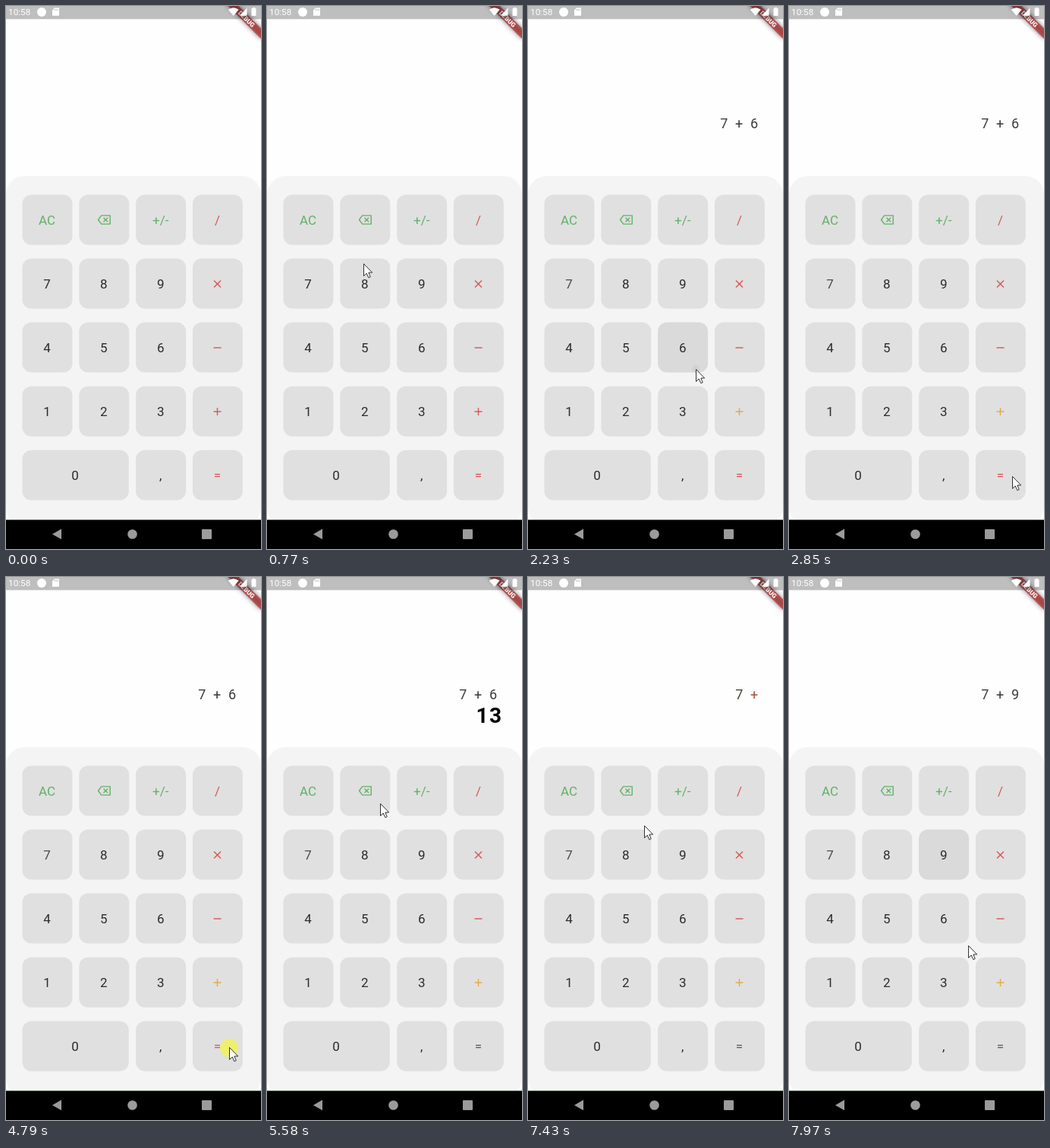
An HTML page with a canvas that plays this animation: 336x715 px, repeating every 8 s.

```html
<!DOCTYPE html>
<html lang="en">
<head>
<meta charset="utf-8">
<title>Calculator</title>
<style>
html, body { margin: 0; width: 336px; height: 715px; overflow: hidden; background: #fefefe; }
canvas { display: block; }
</style>
</head>
<body>
<canvas id="stage" width="336" height="715"></canvas>
<script>
const ctx = document.getElementById('stage').getContext('2d');
const LOOP = 8000, STEP = 77.5;
const FONT = 'Roboto, sans-serif';
const GREEN = '#62b267', RED = '#d95654', ORANGE = '#e5a940', INK = '#2b2b2b';

const rows = [
  ['AC', 'back', '+/-', '/'],
  ['7', '8', '9', '×'],
  ['4', '5', '6', '−'],
  ['1', '2', '3', '+'],
  ['0', '', ',', '=']
];

// pointer path: step, x, y
const path = [
  [1, 304, 692], [5, 138, 340], [8, 138, 340], [9, 134, 334], [14, 68, 379],
  [16, 70, 384], [18, 71, 386], [20, 262, 529], [22, 278, 540], [24, 279, 541],
  [27, 220, 477], [29, 221, 478], [32, 286, 592], [33, 291, 612], [34, 293, 618],
  [36, 293, 618], [37, 294, 619], [64, 294, 619], [72, 149, 298],
  [95, 149, 298], [96, 153, 327], [99, 207, 382], [100, 208, 384], [103, 236, 485]
];

// click step, pressed key, first and last step of the key highlight
const clicks = [
  [16, '7', 17, 19], [22, '+', 23, 25], [27, '6', 28, 30],
  [62, '=', 63, 65], [83, 'back', 84, 86], [99, '9', 100, 103]
];

function poly(points) {
  ctx.beginPath();
  points.forEach(([x, y], i) => i ? ctx.lineTo(x, y) : ctx.moveTo(x, y));
  ctx.closePath();
}

function box(x, y, w, h, r, color) {
  ctx.fillStyle = color;
  ctx.beginPath();
  ctx.roundRect(x, y, w, h, r);
  ctx.fill();
}

function disc(x, y, r, color) {
  ctx.fillStyle = color;
  ctx.beginPath();
  ctx.arc(x, y, r, 0, 7);
  ctx.fill();
}

function label(s, x, y, size, color, weight = 400, align = 'center') {
  ctx.font = `${weight} ${size}px ${FONT}`;
  ctx.textAlign = align;
  ctx.fillStyle = color;
  ctx.fillText(s, x, y);
}

function line(x1, y1, x2, y2) {
  ctx.beginPath();
  ctx.moveTo(x1, y1);
  ctx.lineTo(x2, y2);
  ctx.stroke();
}

function sign(kind, x, y, color) {
  ctx.strokeStyle = color;
  ctx.lineWidth = 1.4;
  if (kind === '×') {
    line(x - 4.5, y - 4.5, x + 4.5, y + 4.5);
    line(x - 4.5, y + 4.5, x + 4.5, y - 4.5);
  } else {
    line(x - 5, y, x + 5, y);
    if (kind === '+') line(x, y - 5, x, y + 5);
  }
}

function backspace(x, y) {
  ctx.strokeStyle = GREEN;
  ctx.lineWidth = 1.4;
  ctx.lineJoin = 'round';
  poly([[x - 8, y], [x - 3.8, y - 5.6], [x + 7.7, y - 5.6], [x + 7.7, y + 5.6], [x - 3.8, y + 5.6]]);
  ctx.stroke();
  line(x - 1, y - 2.8, x + 4.6, y + 2.8);
  line(x - 1, y + 2.8, x + 4.6, y - 2.8);
}

function keyColor(key, row, col, k) {
  if (key === '7' && k >= 17) return '#4c4c4c';
  if (key === '+' && k >= 23) return ORANGE;
  if (key === '=' && k >= 64) return '#6b5353';
  if (col === 3) return RED;
  return row === 0 ? GREEN : INK;
}

function keypad(k) {
  box(0, 224, 336, 460, 24.5, '#f4f4f4');
  rows.forEach((row, r) => row.forEach((key, c) => {
    if (!key) return;
    const x = 21.5 + c * 74.8, y = 248.4 + r * 84.1;
    const w = key === '0' ? 140.3 : 66;
    const down = clicks.some(([, name, a, b]) => name === key && k >= a && k <= b);
    box(x, y, w, 66, 12, down ? '#dadada' : '#e0e0e0');
    const cx = key === '0' ? 91 : x + 32.6, cy = y + 33.4;
    const color = keyColor(key, r, c, k);
    if (key === 'back') backspace(129.5, 281.5);
    else if ('×−+'.includes(key)) sign(key, cx, cy, color);
    else label(key, cx, cy + 6, 17, color);
  }));
}

function readout(k) {
  let text = '';
  if (k >= 17) text = '7';
  if (k >= 24) text = '7+';
  if (k >= 28) text = '7+6';
  if (k >= 85) text = '7+';
  if (k >= 100) text = '7+9';
  const tinted = k >= 85 && k < 100;
  [...text].forEach((ch, i) => {
    const color = !tinted ? '#3c3c3c' : ch === '+' ? '#a8503f' : '#45452f';
    label(ch, 298 - (text.length - 1 - i) * 19.8, 160.5, 18, color);
  });
  if (k >= 64 && k < 85) {
    label('1', 283.5, 192, 28, '#000', 700);
    label('3', 301, 192, 28, '#000', 700);
  }
}

function banner() {
  const s = 0.8175;
  ctx.save();
  ctx.translate(336, -3);
  ctx.rotate(Math.PI / 4);
  ctx.scale(s, s);
  ctx.save();
  ctx.filter = 'blur(3.2px)';
  ctx.fillStyle = 'rgba(0,0,0,.5)';
  ctx.fillRect(-40, 28, 80, 12);
  ctx.restore();
  ctx.fillStyle = 'rgba(183,28,28,.627)';
  ctx.fillRect(-40, 28, 80, 12);
  label('DEBUG', 0.8, 37.6, 10.2, '#fff', 900);
  ctx.restore();
}

function statusBar() {
  ctx.fillStyle = 'rgba(0,0,0,.255)';
  ctx.fillRect(0, 0, 336, 17.3);
  label('10:58', 3, 12.2, 11.8, '#fff', 400, 'left');
  disc(47, 8, 6, '#fff');
  ctx.fillStyle = '#fff';
  poly([[64, 2.5], [70, 2.5], [70, 12.7], [61, 12.7], [61, 5.5]]);
  ctx.fill();
  ctx.fillStyle = '#bdbdbd';
  [63.6, 65.6, 67.6].forEach(x => ctx.fillRect(x, 4, 1, 2.2));
  ctx.fillStyle = '#fff';
  ctx.beginPath();
  ctx.moveTo(299.7, 13);
  ctx.lineTo(292.8, 4.7);
  ctx.quadraticCurveTo(299.7, -0.4, 306.6, 4.7);
  ctx.fill();
  poly([[317.5, 2.5], [317.5, 12.7], [308, 12.7]]);
  ctx.fill();
  box(323.5, 3, 6, 10, 0.8, '#fff');
  ctx.fillRect(325, 2, 3, 1.5);
}

function navBar() {
  ctx.fillStyle = '#000';
  ctx.fillRect(0, 676, 336, 39);
  ctx.fillStyle = '#76907e';
  ctx.fillRect(0, 676, 336, 1);
  ctx.fillStyle = '#9b9b9b';
  poly([[61, 695.4], [73, 688.5], [73, 702.3]]);
  ctx.fill();
  disc(166.5, 695.5, 6.3, '#9b9b9b');
  box(258, 689, 13, 13, 1, '#9b9b9b');
}

function pointerAt(k) {
  const i = path.findIndex(p => p[0] >= k);
  if (i < 0) return path[path.length - 1].slice(1);
  if (i === 0) return path[0].slice(1);
  const [a, ax, ay] = path[i - 1], [b, bx, by] = path[i];
  let u = (k - a) / (b - a);
  u = u * u * (3 - 2 * u);
  return [Math.round(ax + (bx - ax) * u), Math.round(ay + (by - ay) * u)];
}

function pointer(k) {
  if (k < 1) return;
  const [x, y] = pointerAt(k);
  const click = clicks.find(([a]) => k >= a && k <= a + 2);
  if (click) {
    if (k < click[0] + 2) disc(x, y + 1, 12, 'rgba(242,242,82,.8)');
    else disc(x, y, 5, 'rgba(200,200,200,.5)');
  }
  ctx.save();
  ctx.translate(x + 0.5, y + 0.5);
  poly([[0, 0], [0, 16], [3.7, 12.5], [6.3, 18.2], [8.7, 17.2], [6.4, 11.5], [11.2, 11.5]]);
  ctx.fillStyle = '#fff';
  ctx.fill();
  ctx.strokeStyle = '#1c1c1c';
  ctx.lineWidth = 0.9;
  ctx.lineJoin = 'miter';
  ctx.stroke();
  ctx.restore();
}

function draw(t) {
  const k = Math.floor(t / STEP + 0.25);
  ctx.fillStyle = '#fefefe';
  ctx.fillRect(0, 0, 336, 715);
  readout(k);
  keypad(k);
  banner();
  statusBar();
  navBar();
  pointer(k);
}

const start = performance.now();
function tick() {
  draw((performance.now() - start) % LOOP);
  requestAnimationFrame(tick);
}
tick();
</script>
</body>
</html>
```
